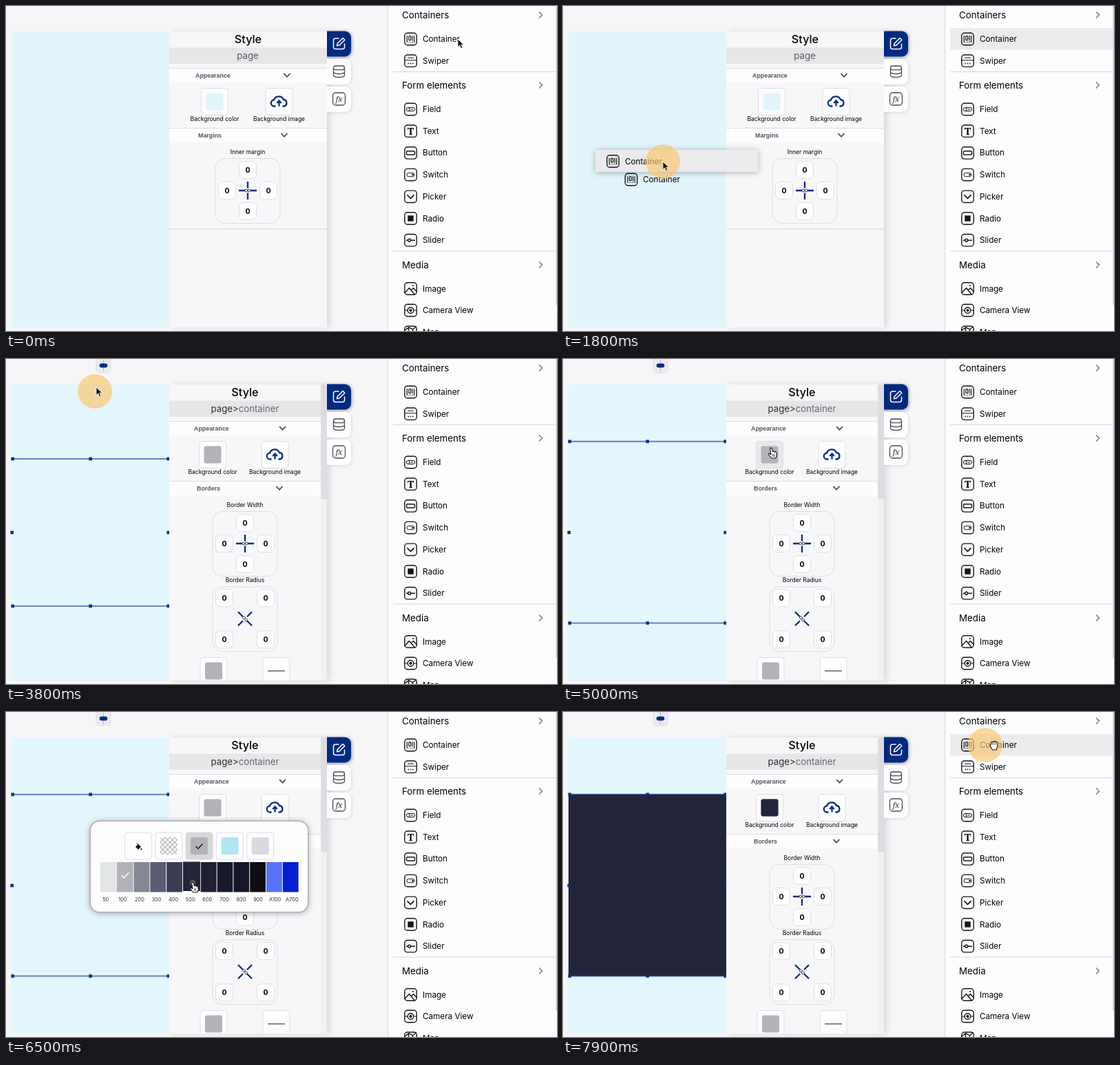
Animation, 800 px wide and 472 px high, one loop 8 s. Source, as an HTML page:

```html
<!DOCTYPE html>
<html lang="en">
<head>
<meta charset="utf-8">
<title>Page builder</title>
<style>
html, body { margin: 0; width: 100%; height: 100%; overflow: hidden; background: #f6f5f8; }
svg { display: block; width: 800px; height: 472px; font-family: Inter, sans-serif; }
.line { fill: none; stroke: #161616; stroke-width: 1.4; stroke-linecap: round; stroke-linejoin: round; }
.navy { fill: none; stroke: #062c83; stroke-width: 2.3; }
.mid { text-anchor: middle; }
.small { font-size: 8.5px; }
.section { font: bold 8.9px "Liberation Sans", Arial, sans-serif; fill: #55555a; }
.value { font-size: 10.5px; font-weight: 700; text-anchor: middle; }

/* 1% = 80 ms */
.early, .late, .rowHover, .ghost, .preview, .buttonHover, .popup, .painted,
.swatchHover, .unpainted, .arrow, .hand, .grab { animation: 8s step-end infinite; }
.early { animation-name: early; }
.late { animation-name: late; }
.rowHover { animation-name: rowHover; }
.ghost { animation-name: ghost; }
.preview { animation-name: preview; }
.buttonHover { animation-name: buttonHover; }
.popup { animation-name: popup; }
.painted { animation-name: painted; }
.unpainted { animation-name: unpainted; }
.swatchHover { animation-name: swatchHover; }
.arrow { animation-name: arrow; }
.hand { animation-name: hand; }
.grab { animation-name: grab; }
@keyframes early { 0% { opacity: 1 } 25%, 100% { opacity: 0 } }
@keyframes late { 0% { opacity: 0 } 25%, 100% { opacity: 1 } }
@keyframes rowHover { 0% { opacity: 0 } 1.25% { opacity: 1 } 25% { opacity: 0 } 95%, 100% { opacity: 1 } }
@keyframes ghost { 0% { opacity: 0 } 15.5% { opacity: 1 } 25%, 100% { opacity: 0 } }
@keyframes preview { 0% { opacity: 0 } 18.75% { opacity: 1 } 25%, 100% { opacity: 0 } }
@keyframes buttonHover { 0% { opacity: 0 } 61.25% { opacity: 1 } 67.5%, 100% { opacity: 0 } }
@keyframes popup { 0% { opacity: 0 } 67.5% { opacity: 1 } 87.5%, 100% { opacity: 0 } }
@keyframes painted { 0% { opacity: 0 } 83.75%, 100% { opacity: 1 } }
@keyframes unpainted { 0% { opacity: 1 } 83.75%, 100% { opacity: 0 } }
@keyframes swatchHover { 0% { opacity: 0 } 78.75% { opacity: 1 } 87.5%, 100% { opacity: 0 } }
@keyframes arrow { 0% { opacity: 1 } 61.25% { opacity: 0 } 88.75% { opacity: 1 } 96.25%, 100% { opacity: 0 } }
@keyframes hand { 0% { opacity: 0 } 61.25% { opacity: 1 } 88.75%, 100% { opacity: 0 } }
@keyframes grab { 0% { opacity: 0 } 96.25%, 100% { opacity: 1 } }

.cursor { animation: travel 8s ease-in-out infinite; }
@keyframes travel {
  0%, 1.25% { transform: translate(656px, 48px) }
  3.75%, 12.5% { transform: translate(660px, 48px) }
  21.25%, 25% { transform: translate(145px, 226px) }
  32.5%, 42.5% { transform: translate(122px, 236px) }
  47.5% { transform: translate(131px, 41px) }
  50%, 52.5% { transform: translate(131px, 28px) }
  55%, 57.5% { transform: translate(130px, 16px) }
  62.5%, 75% { transform: translate(302px, 130px) }
  80%, 87.5% { transform: translate(271px, 248px) }
  95%, 100% { transform: translate(626px, 48px) }
}
.press { animation: press 8s linear infinite; }
@keyframes press {
  0%, 11.25% { transform: scale(0); opacity: .4 }
  12.5%, 23.75% { transform: scale(1); opacity: 1 }
  25%, 36.25% { transform: scale(0); opacity: .4 }
  37.5%, 42.5% { transform: scale(1); opacity: 1 }
  47.5%, 55% { transform: translate(-2px, 6px) scale(1); opacity: 1 }
  56.25%, 63.75% { transform: scale(0); opacity: .4 }
  65%, 66.25% { transform: scale(1); opacity: 1 }
  67.5%, 80% { transform: scale(0); opacity: .4 }
  81.25% { transform: scale(.16); opacity: .5 }
  82.5%, 83.75% { transform: scale(1); opacity: 1 }
  85%, 96.25% { transform: translate(-13px, 0) scale(0); opacity: .4 }
  97.5%, 100% { transform: translate(-13px, 0) scale(1); opacity: 1 }
}
.topEdge { animation: stretchUp 8s linear infinite; }
.bottomEdge { animation: stretchDown 8s linear infinite; }
@keyframes stretchUp {
  0%, 42.5% { transform: translateY(232px) }
  47.5% { transform: translateY(145px) }
  50%, 52.5% { transform: translateY(133px) }
  55%, 100% { transform: translateY(119.7px) }
}
@keyframes stretchDown {
  0%, 42.5% { transform: translateY(271.7px) }
  47.5% { transform: translateY(358.7px) }
  50%, 52.5% { transform: translateY(370.7px) }
  55%, 100% { transform: translateY(383.5px) }
}
</style>
</head>
<body>
<svg id="stage" viewBox="0 0 800 472"></svg>
<script>
const at = (x, y, body, cls = '') => `<g transform="translate(${x} ${y})"><g class="${cls}">${body}</g></g>`;
const box = (x, y, w, h, fill, r = 0, more = '') =>
  `<rect x="${x}" y="${y}" width="${w}" height="${h}" rx="${r}" fill="${fill}" ${more}/>`;
const text = (x, y, s, size, more = '') => `<text x="${x}" y="${y}" font-size="${size}" ${more}>${s}</text>`;
const path = (d, more = 'class="line"') => `<path d="${d}" ${more}/>`;
const solid = d => path(d, 'fill="#161616"');
const chevron = (x, y) => path(`M${x - 4.5} ${y - 2.5}l4.5 4.8 4.5-4.8`, 'fill="none" stroke="#48484d" stroke-width="1.8"');
const label = (x, y, s) => `<text x="${x}" y="${y}" class="mid small">${s}</text>`;
const section = (x, y, s) => `<text x="${x}" y="${y}" class="section">${s}</text>`;
const edge = 'stroke="#dedde2"';

const glyphs = {
  Container: path('M-5.2-4.5V4.5M5.2-4.5V4.5M2.6-4.5V2M2.6 4.2V4.5M-2.6 4.5V4.4M0 4.5V4.4', 'class="line" style="stroke-width:1.2"') +
    box(-2.6, -4.3, 2.8, 6, 'none', 1, 'class="line" style="stroke-width:1.2"'),
  Swiper: path('M-8.5-1H8.5M-4-4.5H4', 'class="line" style="stroke-width:1.1"') + solid('M-4 3h1.6v1.6h-1.6zM-.8 3h1.6v1.6h-1.6zM2.4 3h1.6v1.6h-1.6z'),
  Field: path('M-3.5-2.6h7a2.6 2.6 0 0 1 0 5.2h-7a2.6 2.6 0 0 1 0-5.2M-2-2.5v5M0 0h3', 'class="line" style="stroke-width:1"'),
  Text: '<text class="mid" y="5" font-size="14" font-weight="700" font-family="Noto Serif, serif">T</text>',
  Button: box(-6, -2.6, 12, 5.2, 'none', 1.5, 'class="line"'),
  Switch: box(-5.5, -2.6, 11, 5.2, 'none', 2.5, 'stroke="#161616"') + '<circle cx="3" r="1.3"/>',
  Picker: path('M-4.5-2L0 2.7 4.5-2', 'class="line" style="stroke-width:1.8"'),
  Radio: solid('M-4.2-4.2h8.4v8.4h-8.4z'),
  Slider: path('M-6 0h2.2M.2 0H6') + '<circle cx="-1.8" r="2" class="line"/>',
  Image: path('M-8.5 6l6.5-7 8 9.5M1 2L4-1 8.5 4') + '<circle cx="3.5" cy="-4.5" r="1"/>',
  'Camera View': '<circle r="4.3" class="line"/><circle r="2"/>' + path('M-8.5 0h4M4.5 0h4', 'class="line" style="stroke-width:1"'),
  Map: path('M-8-3l5-4 6 3 5-4M-3-7V5M3-4V5')
};
const icon = name => box(-8.7, -8.7, 17.4, 17.4, 'none', 4, 'class="line"') + glyphs[name];
const row = (name, y) => at(587.5, y, icon(name)) + text(605, y + 4, name, 11.7);
const header = (name, y) => text(575, y + 4.7, name, 13.3) +
  path(`M774 ${y - 4.5}l4.5 4.5-4.5 4.5`, 'fill="none" stroke="#77777c" stroke-width="1.4"');
const rule = y => box(562, y, 236, 1, '#d5d4d9');

const sidebar = () => {
  const fields = ['Field', 'Text', 'Button', 'Switch', 'Picker', 'Radio', 'Slider'];
  return box(554, 0, 246, 472, '#fdfcfe') + box(554, 0, 1, 472, '#d8d7dc') + box(798.3, 0, 1.7, 434, '#d0cfd4') +
    box(562, 32, 236, 31.5, '#ebeaec', 0, 'class="rowHover"') +
    header('Containers', 13) + row('Container', 48) + row('Swiper', 79.7) + rule(95) +
    header('Form elements', 115) + fields.map((f, i) => row(f, 150 + i * 31.7)).join('') + rule(355.5) +
    header('Media', 376) + row('Image', 410.5) + row('Camera View', 442) + row('Map', 473.7);
};

const button = (x, y, body) => box(x - 19.5, y - 19.5, 39, 39, '#fdfcfe', 4, edge) + at(x, y, body);
const swatch = (fill, cls = '') => box(-12.5, -12.5, 25, 25, fill, 3, `class="${cls}"`);
const cloud = path('M-5 6.5h-2A4.5 4.5 0 0 1-7.5-2.5 7.5 7.5 0 0 1 6.5-3 4.8 4.8 0 0 1 7 6.5H5M0 6.5V-1M-3.2 2L0-1.5 3.2 2', 'class="navy"');
const cell = (x, y) => box(x - 12.5, y - 12.5, 25, 25, '#fdfcfe', 6, edge) + `<text x="${x}" y="${y + 3.8}" class="value">0</text>`;
const link = '<g fill="#f7f6f9" stroke="#333" stroke-width=".9"><circle cx="-2.2" r="1.9"/><circle cx="2.2" r="1.9"/></g>';
const frame = box(-47, -46.5, 94, 94, 'none', 14, edge);
const sides = (x, y) => at(x, y, frame + path('M0-13V-3.5M0 3.5V13M-13 0H-3.5M3.5 0H13', 'class="navy"') + link +
  cell(0, -30) + cell(-30, 0) + cell(30, 0) + cell(0, 30));
const corners = (x, y) => at(x, y, frame +
  path('M-10-10l7 7M10-10l-7 7M-10 10l7-7M10 10l-7-7', 'class="navy"') + `<g transform="rotate(45)">${link}</g>` +
  cell(-30, -30) + cell(30, -30) + cell(-30, 30) + cell(30, 30));

const panelBase = width =>
  box(237, 37, 229, 430, '#f7f6f9') + box(237, 60.5, width, 23.5, '#e6e5e8') +
  box(237, 90, width, 1, '#dddce1') + box(237, 91, width, 20.5, '#fdfcfe') +
  box(237, 177, width, 1, '#dddce1') + box(237, 178, width, 20.5, '#fdfcfe');

const pagePanel = () => panelBase(229) +
  text(351.5, 54, 'Style', 16.2, 'class="mid" font-weight="500"') + text(351, 76.5, 'page', 13.3, 'class="mid" fill="#5a5a5f"') +
  section(275, 103.8, 'Appearance') + chevron(408, 100.5) +
  button(303, 139, swatch('#e1f4f9')) + button(396.5, 139, cloud) +
  label(303, 167, 'Background color') + label(396.5, 167, 'Background image') +
  section(279, 190.8, 'Margins') + chevron(404, 187.5) +
  label(351, 214.5, 'Inner margin') + sides(351, 268) + box(237, 323.5, 229, 1, '#d5d4d9');

const containerPanel = () => panelBase(220) +
  box(457, 37, 9, 430, '#f1f0f3') + box(457, 37, 9, 167, '#dddce0', 3) +
  text(347, 54, 'Style', 16.2, 'class="mid" font-weight="500"') +
  text(347, 76.5, 'page&gt;<tspan fill="#66666b">container</tspan>', 13.2, 'class="mid" fill="#2b2b2f"') +
  section(273, 103.8, 'Appearance') + chevron(401.5, 100.5) +
  button(300, 139, box(-19.5, -19.5, 39, 39, '#e9e8eb', 4, `class="buttonHover" ${edge}`) +
    swatch('#b2b3ba') + swatch('#22243a', 'painted')) +
  button(390.5, 139, cloud) +
  label(300, 167, 'Background color') + label(390.5, 167, 'Background image') +
  section(277, 190.8, 'Borders') + chevron(397, 187.5) +
  label(347, 214.5, 'Border Width') + sides(347, 268) +
  label(347, 324, 'Border Radius') + corners(347, 377.3) +
  `<g clip-path="url(#panelClip)">${button(301.5, 453, swatch('#b2b3ba'))}${button(392.5, 453, path('M-12.5 0h25', 'stroke="#161616"'))}</g>`;

const tab = (y, fill, shadow, body) =>
  path(`M466 ${y}h26a9 9 0 0 1 9 9v19a9 9 0 0 1-9 9h-26z`, `fill="${fill}" filter="url(#${shadow})"`) + at(483.5, y + 18, body);
const tabs = () =>
  tab(36.5, '#052b80', 'soft', `<g fill="none" stroke="#fff" stroke-width="1.5" stroke-linejoin="round">
    <path d="M0-7.5H-5a3 3 0 0 0-3 3V5a3 3 0 0 0 3 3H5a3 3 0 0 0 3-3V0M-3 3.2l.7-3.2L5.5-8l2.8 2.8L.5 2.5z"/></g>`) +
  tab(77, '#fdfcfe', 'faint', `<g fill="none" stroke="#4c4c51" stroke-width="1.3"><rect x="-8" y="-8" width="16" height="5.6" rx="2.8"/>
    <path d="M-8-4.5V6Q-7 8.5 0 8.5T8 6V-4.5M-8 1Q-7 3.5 0 3.5T8 1"/></g>`) +
  tab(117, '#fdfcfe', 'faint', box(-9, -9, 18, 18, 'none', 4, 'stroke="#4c4c51" stroke-width="1.3"') +
    '<text class="mid" y="4" font-size="11" font-style="italic" font-family="Noto Serif, serif" fill="#333">fx</text>');

const knob = x => box(x - 2.3, -2.3, 4.6, 4.6, '#062c83');
const edgeLine = cls => `<g class="${cls}">${box(9, -.6, 227, 1.2, '#0f3686')}${[9.7, 122.7, 235.7].map(knob).join('')}</g>`;
const selection = () => box(8, 119.5, 229, 264, '#22243a', 0, 'class="painted"') +
  edgeLine('topEdge') + edgeLine('bottomEdge') + at(0, 252, knob(8.7) + knob(235.7)) +
  box(131, -6, 21, 26, '#ebeaee', 5, edge) + box(141, 1, 1, 17, '#a9b6d5') + box(135.7, 6.5, 11.6, 6, '#062c83', 3);

const shades = [['50', '#e1e5e6'], ['100', '#b2b3ba'], ['200', '#868795'], ['300', '#5b5d72'], ['400', '#3c3d55'], ['500', '#22243a'],
  ['600', '#211f33'], ['700', '#181a2b'], ['800', '#151729'], ['900', '#0e0d14'], ['A100', '#5872f8'], ['A700', '#0320d2']];
const tick = (x, y, color, size, cls = '') =>
  path(`M${x - size} ${y}l${size * .7} ${size * .7} ${size * 1.3}-${size * 1.4}`, `class="${cls}" fill="none" stroke="${color}" stroke-width="1.5"`);
const palette = () => {
  // The chosen and the hovered shade are slightly wider than the rest.
  const left = i => 137 + i * 23.8 + (i > 1 ? 1 : 0) + (i > 5 ? 2 : 0);
  const bucket = solid('M-4 1.5L0-2.8 4 1.2 0 5.2z') + path('M-2.5-4l2.5 2.5', 'stroke="#161616"') + '<circle cx="4.6" cy="4.6" r="1.1"/>';
  const heads = [bucket, swatch('url(#checks)'), '', swatch('#b3e6f5'), swatch('#dad9dd')];
  return box(122.2, 158.2, 316.6, 132.6, '#fdfcfe', 14, 'stroke="#aaa9af" stroke-width="1.5" filter="url(#lift)"') +
    heads.map((h, i) => button(192 + i * 44.3, 194.5, h)).join('') +
    box(261, 175, 39, 39, '#d8d7da', 4) + at(280.5, 194.5, swatch('#b2b3ba')) + tick(280.5, 195, '#161616', 5) +
    shades.map(([name, color], i) => box(left(i), 218, left(i + 1) - left(i) - 1, 43.5, color) +
      text(144.7 + i * 24.6, 274.5, name, 7.4, 'class="mid" fill="#333"')).join('') +
    box(left(5), 217.5, left(6) - left(5) - 1, 42, '#22243a', 0, 'class="swatchHover"') +
    box(left(5), 260, left(6) - left(5) - 1, 2, '#fdfcfe', 0, 'class="swatchHover"') +
    tick(173, 237, '#fff', 5.5, 'unpainted') + tick(270, 237, '#fff', 5.5, 'painted');
};

const arrow = path('M0 0V11.5l2.7-2.5 2 4.5 2.2-1-2-4.3H8.6z', 'fill="#111" stroke="#fff" stroke-width=".8"');
const hand = path('M-1.5 0Q0-1.8 1.3 0L2.6 4.5 4 4 5.4 5 6.7 4.6 7.8 5.6 8.4 10 6.8 14H1L-3.5 9Q-4 7.3-2.3 7.4L0 8.7z',
  'fill="#fff" stroke="#111" stroke-width="1.1" stroke-linejoin="round"') + path('M2.7 8v4M4.6 8v4', 'stroke="#111" stroke-width=".8"');
const fist = path('M-4.5-1.5V-4q1-1.5 2.2 0 1-2 2.3-.6 1.2-1.6 2.4.2 1.8-1 2.5.8V2L3 7h-5.5L-5.5 2Q-6-1-4.5-1.5z',
  'fill="#fff" stroke="#111" stroke-width="1.1"') + path('M-2.2-3.5v3M.2-3.5v3M2.5-3.5v3', 'stroke="#111" stroke-width=".8"');
const ghost = box(-98, -17, 236, 32, '#ebeaec', 0, 'filter="url(#lift)"') + at(-72.5, -.5, icon('Container')) + text(-55, 3.5, 'Container', 11.7);

const shadow = (id, dx, dy, blur, alpha) => `<filter id="${id}" x="-30%" y="-40%" width="160%" height="180%">
  <feDropShadow dx="${dx}" dy="${dy}" stdDeviation="${blur}" flood-opacity="${alpha}"/></filter>`;
document.getElementById('stage').innerHTML = `
<defs>
  ${shadow('soft', 1, 1, 2.5, .4)}${shadow('faint', 1, 1, 2, .12)}
  ${shadow('side', 4, 0, 4, .12)}${shadow('lift', 0, 1, 4, .3)}
  <clipPath id="panelClip"><rect x="237" y="37" width="229" height="430"/></clipPath>
  <clipPath id="shadowClip"><rect x="237" y="30" width="260" height="442"/></clipPath>
  <pattern id="checks" width="7" height="7" patternUnits="userSpaceOnUse">
    <rect width="7" height="7" fill="#fff"/><path d="M0 0h3.5v7H7V3.5H0z" fill="#bdbdbf"/></pattern>
</defs>
${box(0, 0, 800, 472, '#f6f5f8')}
${box(8, 37, 229, 430, '#e1f4f9')}
${box(8, 37, 229, 430, '#e4f6fd', 0, 'class="late"')}
<g class="late">${selection()}</g>
<g class="preview">${at(99, 252, icon('Container'))}${text(116, 256, 'Container', 11.7)}</g>
<g clip-path="url(#shadowClip)">${box(237, 37, 229, 430, '#f7f6f9', 0, 'filter="url(#side)"')}</g>
${tabs()}
<g class="early">${pagePanel()}</g>
<g class="late">${containerPanel()}</g>
${sidebar()}
<g class="popup">${palette()}</g>
<g class="cursor">
  <g class="ghost">${ghost}</g>
  <circle class="press" r="25" fill="#f8c870" fill-opacity=".68"/>
  <g class="arrow">${arrow}</g><g class="hand">${hand}</g><g class="grab">${fist}</g>
</g>`;
</script>
</body>
</html>
```
